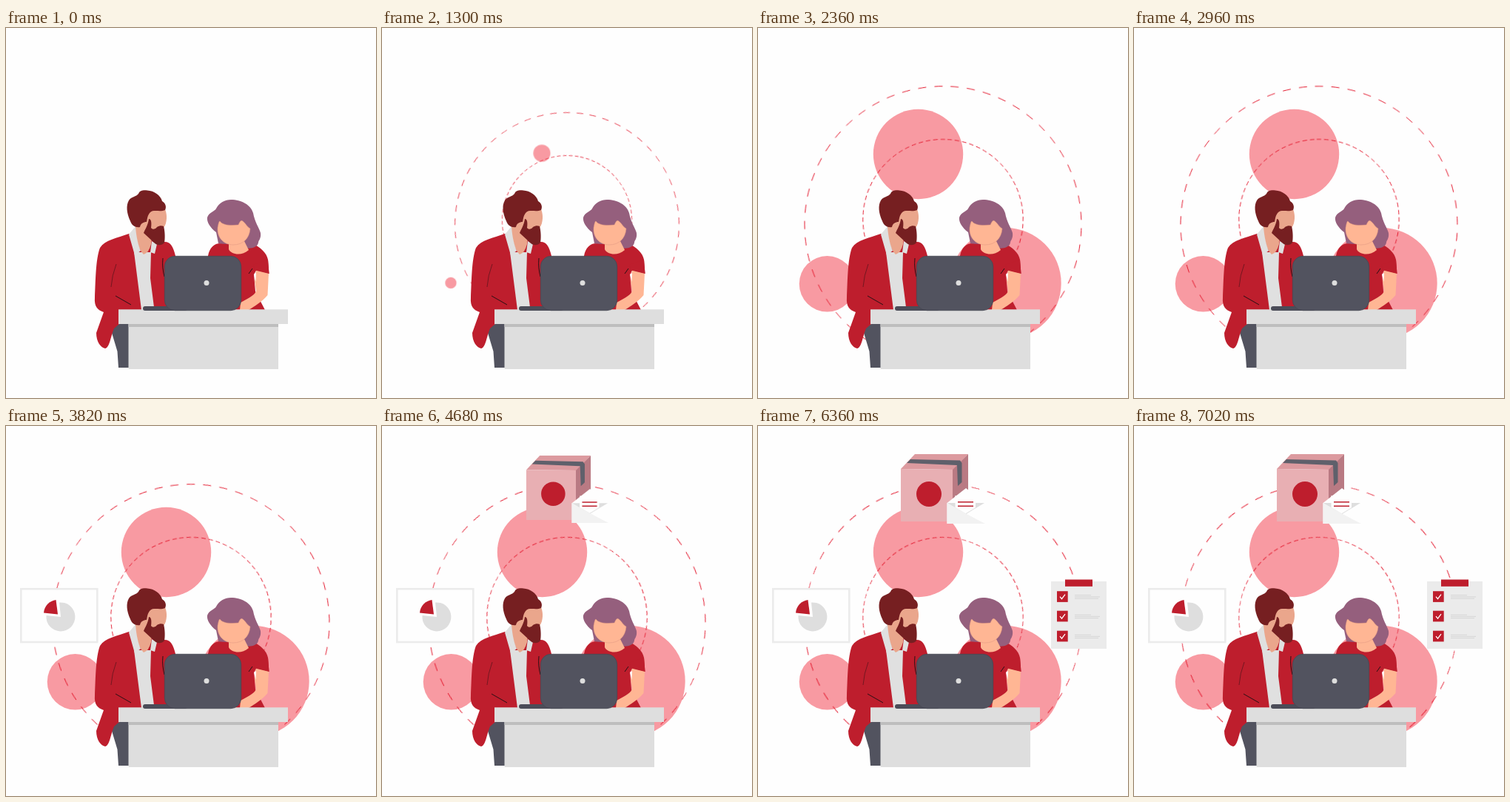
Write an HTML page that moves like this. It is 500 px wide and 500 px high and loops after 7.04 s.

```html
<!DOCTYPE html>
<html lang="en">
<head>
<meta charset="utf-8">
<title>Teamwork</title>
<style>
  html, body { margin: 0; width: 100%; height: 100%; overflow: hidden; background: #fefefe; }
  svg { display: block; width: 100vw; height: 100vh; }
  .red { fill: #be1e2d; }
  .slate { fill: #52535f; }
  .grey { fill: #dedede; }
  .skin { fill: #ffb694; }
  .tan { fill: #eaa68c; }
  .hair { fill: #761f21; }
  .plum { fill: #955f7d; }
  .blob { fill: #f89aa2; }
  .ring { fill: none; stroke: #e3182d; stroke-width: 1; }
  .ink { fill: none; stroke: #2a1014; stroke-width: 1; }
</style>
</head>
<body>
<svg viewBox="0 0 500 500">
  <circle class="blob" id="blobTop" cx="216.5" cy="170.5" r="60.7"/>
  <circle class="blob" id="blobLeft" cx="93.5" cy="345.8" r="37.8"/>
  <circle class="blob" id="blobRight" cx="334.7" cy="345" r="75"/>
  <g id="rings">
    <circle class="ring" id="outer" cx="250" cy="265.7" r="187"/>
    <circle class="ring" id="inner" cx="250" cy="258.6" r="108.2"/>
  </g>

  <g id="chart">
    <rect x="20.3" y="220.2" width="103" height="71.8" fill="#fefefe" stroke="#ebebeb" stroke-width="2.6"/>
    <path class="grey" d="M74 258L54.5 256A19.5 19.5 0 1 0 72 238.5Z"/>
    <path class="red" d="M70 254.5L51 252.5A19 19 0 0 1 67.5 235Z"/>
  </g>

  <g id="parcel">
    <path fill="#dc9a9f" d="M193 58L212 38H284L264 59Z"/>
    <path fill="#b97a83" d="M263 59L284 38V86L263 105Z"/>
    <path fill="#e8afb3" d="M193 58L263 59V129H193Z"/>
    <path fill="#5f606b" d="M206 45L273 46.500L275.500 50V76L270 81L269 53L201 50Z"/>
    <circle class="red" cx="231" cy="92" r="17"/>
  </g>
  <g id="mail">
    <path fill="#fefefe" d="M255.500 104L281 84L307 104V132H255.500Z"/>
    <path class="grey" d="M255.500 104H306L281 119Z"/>
    <path fill="#fefefe" d="M266.500 94H294V111L281 118.500L266.500 110Z"/>
    <path d="M270 102.800H291M270 108.300H291" stroke="#be1e2d" stroke-width="1.500"/>
    <path fill="#f2f2f2" d="M255.500 104L281 118.500L307 132H255.500Z"/>
    <path d="M281 118.500L294 110.500" stroke="#dedede" stroke-width=".8"/>
  </g>

  <g id="board">
    <rect x="396" y="210" width="75" height="91" fill="#ebebeb"/>
    <rect class="red" x="415" y="207.500" width="37" height="9.300"/>
    <g id="rows"></g>
  </g>

  <g id="man">
    <path class="slate" d="M166 400H153Q144 403 143 412L150.500 437L152 459H166Z"/>
    <path class="red" d="M166 278C150 284 134 286 127 297C121 312 121 345 120 364C119 377 124 381 132 384L122 412C122 424 128 432 134 433C140 432 141 418 146 406L153 400H229V308C226 295 222 288 213 289Z"/>
    <path fill="#e0e0e0" d="M173 303H196L195 338L200.500 381H183Z"/>
    <path class="tan" d="M175 268L188 258L197 284L196 292Q193 304 186 306Q179 300 175 280Z"/>
    <path fill="#e0e0e0" d="M166 279L175 268C176 283 179 294 182 301L174 307ZM195 303L197 288L204 292L201 305Z"/>
    <path class="tan" d="M186 264L192 247L215 245C218 252 218 263 213 270L205 274H193Z"/>
    <path class="hair" d="M181 269C175 270 170 267 168 261C163 250 162 240 166 233C169 228 176 228 179 224C181 219 186 219 191 219.500C200 220 209 226 211 234C216 237 217 242 215 246C209 249 199 245 195 249C191 253 191 258 190 262C186 262 182 264 181 269Z"/>
    <path class="hair" d="M193 258C196 258 197 262 196 270C198 273 202 272 204 269C207 267 211 267 213 268C215 275 215 285 214 290C210 295 203 294 199 289L186 277C188 272 192 266 193 258Z"/>
    <path class="ink" d="M148 362L169 374M212 311C211 320 212 328 214 336"/>
    <path class="ink" opacity=".5" d="M149 319Q143 335 142 350"/>
  </g>

  <g id="woman">
    <path class="red" d="M273 308C275 297 281 291 290 291H333C345 297 352 304 354 313L355.500 332L338 328L335 333L337 356L350 381H273Z"/>
    <path class="skin" d="M338 327L355 331.500L353.500 361C346 370 336 376 327 381.500H316L317 371C330 364 337 360 338 355L336 342Z"/>
    <path class="red" d="M334 320L354 313L355.500 332L337 327.500Z"/>
    <path fill="#fefefe" d="M335 333L338 331L337.500 343Z"/>
    <path class="ink" d="M328 332L333 325"/>
    <path class="plum" d="M287 291L284 276C276 270 271 262 272 256C274 249 282 248 284 244C288 236 296 232 304 232C318 232 331 239 334 250C336 262 342 270 344 277C345 285 341 287 341 290C340 297 329 299 323 297C310 290 295 293 287 291Z"/>
    <path class="skin" d="M301 290V299C304 306 318 309 328 300L322 288Z"/>
    <path class="skin" stroke="#dd9580" stroke-width=".5" d="M286 270C287 264 288 261 289 261C293 267 304 267 314 266C316 262 317 259 320 261C323 263 327 270 330 271C329 285 320 293 307 293C295 293 285 284 286 270Z"/>
  </g>

  <g id="desk">
    <rect class="grey" x="165.500" y="400" width="202.500" height="61"/>
    <rect x="165.500" y="400" width="202.500" height="4" fill="#bebebe"/>
    <rect class="grey" x="152" y="380.300" width="229" height="19.700"/>
    <rect x="185" y="376" width="60" height="6" rx="3" fill="#4b4c58"/>
    <rect class="slate" x="214.300" y="308.300" width="103.400" height="73.400" rx="14" stroke="#474853" stroke-width=".8"/>
    <circle class="grey" cx="271" cy="344.500" r="3.500"/>
  </g>
</svg>
<script>
const LOOP = 7040;
const $ = id => document.getElementById(id);

$('rows').innerHTML = [230.5, 257, 284].map(y => `
  <g transform="translate(404 ${y - 7.3})">
    <rect class="red" width="14.700" height="14.700"/>
    <path d="M4 7.500L6.500 10.500L11 4.500" fill="none" stroke="#fff" stroke-width="1.300"/>
    <path d="M24 5.500H46M24 7.700H58M24 9.900H56" stroke="#d3d3d3" stroke-width=".9"/>
  </g>`).join('');

// Steps are [ms, scale, dx, dy].
function pop(id, x, y, steps) {
  const el = $(id);
  el.style.transformOrigin = `${x}px ${y}px`;
  const frame = ([ms, s, dx = 0, dy = 0]) => ({
    offset: ms / LOOP,
    transform: `translate(${dx}px, ${dy}px) scale(${s})`,
    easing: s ? 'ease-in-out' : 'ease-out'
  });
  const all = [[0, 0], ...steps, [LOOP, 1]];
  el.animate(all.map(frame), { duration: LOOP, iterations: Infinity });
}

// A dash is centred at the top at 2960 ms; rate is in degrees per second.
function spin(id, count, dash, rate) {
  const el = $(id), r = +el.getAttribute('r');
  const start = -90 - rate * 2.96 - dash / r * 90 / Math.PI;
  el.style.transformOrigin = `${el.getAttribute('cx')}px ${el.getAttribute('cy')}px`;
  el.style.strokeDasharray = `${dash} ${2 * Math.PI * r / count - dash}`;
  el.animate([
    { transform: `rotate(${start}deg)` },
    { transform: `rotate(${start + rate * LOOP / 1000}deg)` }
  ], { duration: LOOP, iterations: Infinity });
}

const bounce = t => [[t, 0], [t + 280, 1.04], [t + 480, .957], [t + 640, 1]];
const swell = k => [
  [1260, 0], [1640, 1 + (k - 1) * 1.3, -3, -8],
  [1820, k, -2.5, -6.5], [1870, 1]
];

pop('rings', 250, 265.7, [[1160, 0], [1440, 1.176], [1620, .96], [1780, 1]]);
pop('blobTop', 216.5, 170.5, swell(1.08));
pop('blobLeft', 93.5, 345.8, swell(1.13));
pop('blobRight', 334.7, 345, swell(1.053));
pop('chart', 71.7, 256, bounce(3110));
pop('parcel', 238.5, 83.5, bounce(4200));
pop('mail', 281, 108, bounce(4220));
pop('board', 433.5, 254, bounce(5275));
spin('outer', 53, 11, -8);
spin('inner', 68, 6, -8);
</script>
</body>
</html>
```
